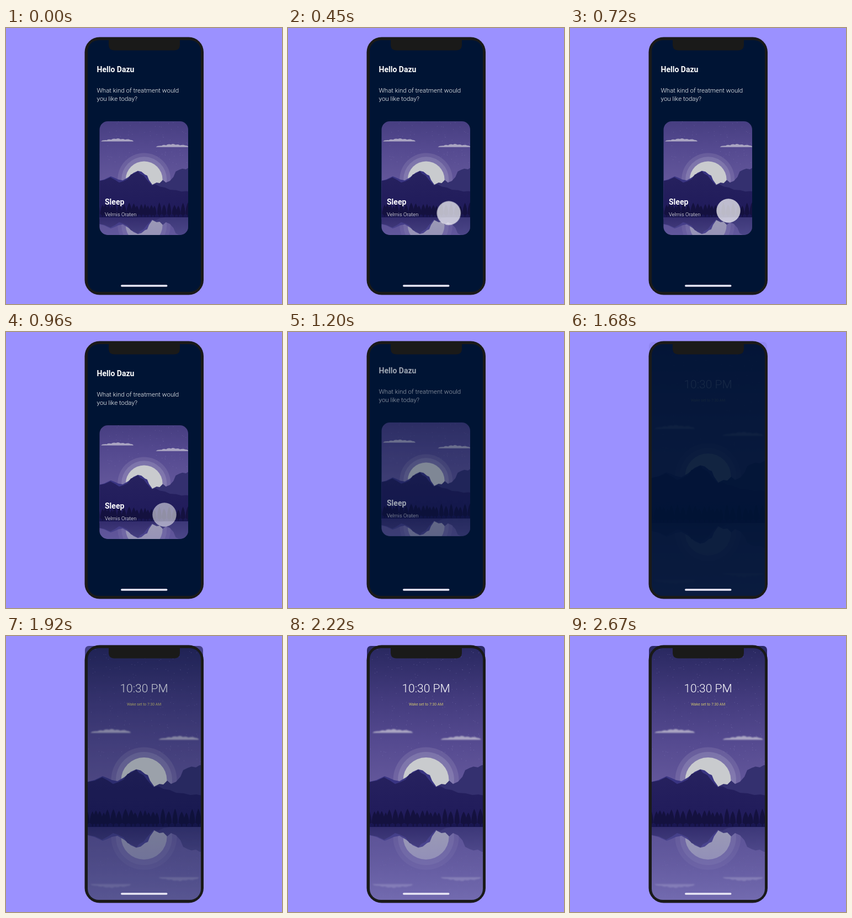
These frames come from a looping animation (500x500 px, 2700 ms). An HTML page:

```html
<!DOCTYPE html>
<html lang="en">
<head>
<meta charset="utf-8">
<title>Sleep treatment</title>
<style>
  html, body { margin: 0; width: 100%; height: 100%; overflow: hidden; background: #9b91ff; }
  svg { display: block; width: 100vw; height: 100vh; }
  text { font-family: Roboto, sans-serif; fill: #fff; }
  .bold { font-weight: 700; font-size: 14px; }
  .light { font-weight: 300; }

  .home { animation: leave 2.7s linear infinite; }
  .night { animation: appear 2.7s linear infinite; }
  .touch { animation: slide 2.7s infinite, tap 2.7s linear infinite; }

  @keyframes leave {
    0%, 40% { opacity: 1; transform: none; }
    52.2%, 100% { opacity: 0; transform: translateY(-14px); }
  }
  @keyframes appear {
    0%, 61.1% { opacity: 0; }
    74.1%, 100% { opacity: 1; }
  }
  @keyframes slide {
    0% { transform: translate(90px, 90px); animation-timing-function: cubic-bezier(.215, .61, .355, 1); }
    25.2%, 100% { transform: none; }
  }
  @keyframes tap {
    0% { opacity: 0; }
    5%, 33.9% { opacity: .71; }
    40.7%, 100% { opacity: 0; }
  }
</style>
</head>
<body>
<svg viewBox="0 0 500 500">
  <defs>
    <linearGradient id="sky" gradientUnits="userSpaceOnUse" x1="0" y1="20" x2="0" y2="285">
      <stop offset="0" stop-color="#292860"/>
      <stop offset=".35" stop-color="#433b7d"/>
      <stop offset=".65" stop-color="#554a90"/>
      <stop offset="1" stop-color="#665a9d"/>
    </linearGradient>
    <linearGradient id="front" gradientUnits="userSpaceOnUse" x1="0" y1="240" x2="0" y2="346">
      <stop offset="0" stop-color="#27225f"/>
      <stop offset="1" stop-color="#1f1a5a"/>
    </linearGradient>
    <linearGradient id="haze" gradientUnits="userSpaceOnUse" x1="0" y1="346" x2="0" y2="478">
      <stop offset="0" stop-color="#8078bd" stop-opacity=".02"/>
      <stop offset="1" stop-color="#8078bd" stop-opacity=".75"/>
    </linearGradient>
    <filter id="soft" x="-10%" y="-60%" width="120%" height="220%">
      <feGaussianBlur stdDeviation=".9"/>
    </filter>
    <clipPath id="screen"><rect x="148" y="22" width="205" height="456" rx="20"/></clipPath>
    <clipPath id="card"><rect x="169.5" y="169" width="160.5" height="206" rx="15"/></clipPath>
    <clipPath id="lake"><rect x="140" y="346" width="220" height="140"/></clipPath>

    <path id="cloud" filter="url(#soft)" fill="#aaa5c2"
      d="M153 175.500Q156 172 166 172.500Q170 169.500 176 171.500Q180 168 187 170Q192 167 197 170.500Q203 168.500 207 171.500Q214 169.500 219 172Q225 172 226 175.500Z"/>

    <g id="above">
      <rect x="140" y="15" width="220" height="335" fill="url(#sky)"/>
      <path id="stars" stroke="#a8a0d8" stroke-width=".8" stroke-linecap="round" opacity=".5"/>
      <g fill="#c9c8dc">
        <circle cx="250" cy="261" r="59.500" opacity=".14"/>
        <circle cx="250" cy="261" r="51" opacity=".2"/>
      </g>
      <circle cx="250" cy="261.500" r="41.500" fill="#c9cbce"/>
      <use href="#cloud"/>
      <use href="#cloud" x="123.500" y="12.500"/>
      <path fill="#34306f" d="M262 276L278 268L285 269L292 262L299 268L308 264L316 255L321 243L329 239L336 236.500L344 238L351 234L360 234V350H262Z"/>
      <path fill="#393482" d="M140 266L160 261L175 254L183 257L192 261L202 263L214 256L226 246L236 241.500L244 243.500L252 250L257 252L261 262L268 272V350H140Z"/>
      <path fill="url(#front)" d="M140 266L161 262L174 256L185 262L194 268L203 265L213 260L220 250L228 247L236 242L241 248L249 252L255 260L262 268L268 274L276 272L285 277L297 279L308 284L322 285L334 288L345 287L360 290V350H140Z"/>
    </g>

    <g id="scene">
      <use href="#above"/>
      <rect x="140" y="340" width="220" height="7" fill="#191651"/>
      <path id="trees" fill="#14113f"/>
      <g clip-path="url(#lake)">
        <rect x="140" y="346" width="220" height="140" fill="#4a4488"/>
        <use href="#above" transform="translate(0 625) scale(1 -1)" opacity=".65"/>
        <rect x="140" y="346" width="220" height="140" fill="url(#haze)"/>
      </g>
    </g>
  </defs>

  <rect class="night" x="143" y="18" width="214" height="40" rx="7" fill="#2c2a66"/>
  <rect x="142.500" y="16.500" width="215.500" height="467" rx="27" fill="#1a1a19"/>
  <rect x="148" y="22" width="205" height="456" rx="20" fill="#001434"/>

  <g clip-path="url(#screen)">
    <g class="home">
      <text class="bold" x="164.500" y="80">Hello Dazu</text>
      <g class="light" font-size="11.500">
        <text x="164.500" y="117">What kind of treatment would</text>
        <text x="164.500" y="132">you like today?</text>
      </g>
      <g clip-path="url(#card)">
        <use href="#scene" transform="translate(48.700 64.100) scale(.806)"/>
      </g>
      <text class="bold" x="179" y="320">Sleep</text>
      <text class="light" x="179" y="341" font-size="9.400">Velmis Oraten</text>
    </g>
    <g class="night">
      <use href="#scene"/>
      <g text-anchor="middle">
        <text class="light" x="250" y="102" font-size="21">10:30 PM</text>
        <text x="250" y="126.300" font-size="6.800" style="fill:#cfc46e">Wake set to 7:30 AM</text>
      </g>
    </g>
  </g>

  <path fill="#1a1a19" d="M186 21H315V30Q315 40.500 304.500 40.500H196.500Q186 40.500 186 30Z"/>
  <rect x="208" y="465.200" width="84.500" height="3.600" rx="1.800" fill="#e9e7f5"/>
  <circle class="touch" cx="287" cy="331" r="21.700" fill="#fff"/>
</svg>
<script>
  let seed = 7;
  const rand = () => (seed = seed * 16807 % 2147483647) / 2147483647;
  const setPath = (id, d) => document.getElementById(id).setAttribute('d', d);

  let stars = '';
  for (let i = 0; i < 190; i++) {
    const x = 145 + rand() * 210, y = 24 + 205 * rand() ** 1.2;
    stars += `M${x.toFixed(1)} ${y.toFixed(1)}h.01`;
  }
  setPath('stars', stars);

  // Pointed cypress shapes along the shore
  let trees = '';
  for (let x = 145; x < 358; x += 6 + rand() * 6) {
    const h = 22 + rand() * 9, w = 4.8 + rand() * 1.6, base = 342;
    trees += `M${x} ${base - h}C${x + w * .7} ${base - h * .75} ${x + w} ${base - h * .4} ${x + w} ${base - 3}` +
      `L${x + 1} ${base - 1}v4h-2v-4L${x - w} ${base - 3}C${x - w} ${base - h * .4} ${x - w * .7} ${base - h * .75} ${x} ${base - h}Z`;
  }
  setPath('trees', trees);
</script>
</body>
</html>
```
